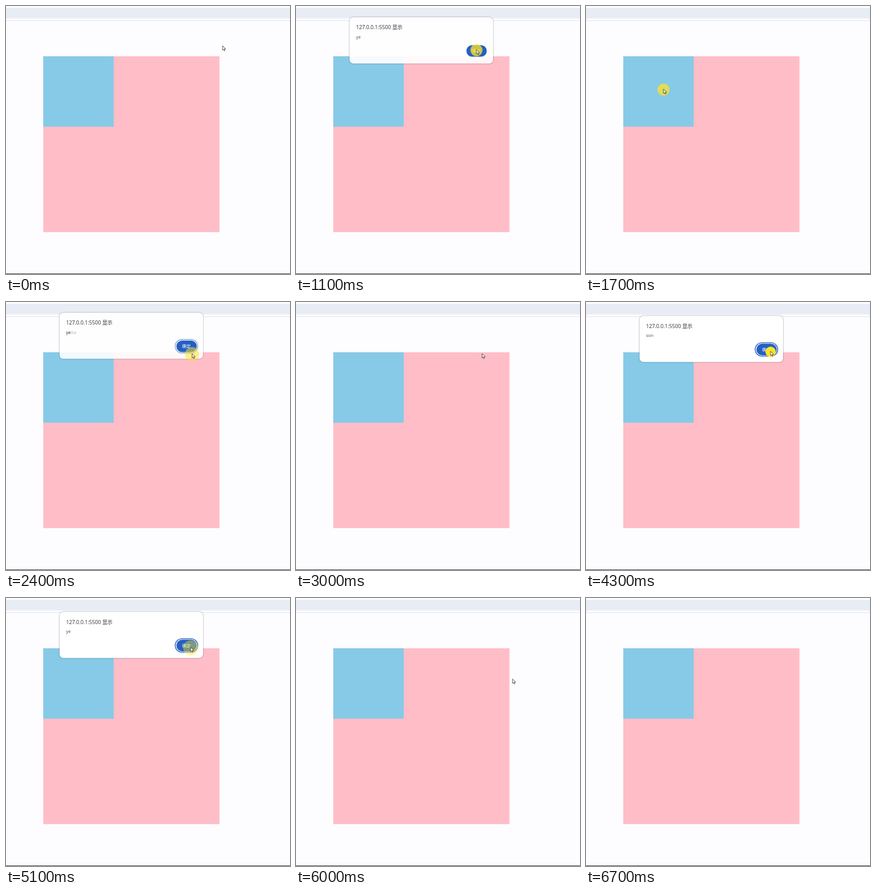
Recreate the animation shown at these times as an HTML page. Size 480 by 452 pixels, loop 7700 ms.

```html
<!DOCTYPE html>
<html lang="zh">
<head>
<meta charset="utf-8">
<title>Event bubbling</title>
<style>
  html, body { margin: 0; width: 100%; height: 100%; overflow: hidden; background: #fdfcff; }
  svg { display: block; width: 100vw; height: 100vh; }
  text { font-family: "Open Sans", "Noto Sans CJK SC", "Noto Sans CJK", sans-serif; }
  #panel { filter: drop-shadow(0 .9px 1px rgba(40, 45, 60, .55)); }
</style>
</head>
<body>
<svg viewBox="0 0 480 452">
  <rect width="480" height="452" fill="#fdfcff"/>
  <rect y="3" width="480" height="18" fill="#e8edf5"/>
  <rect y="24" width="480" height="1" fill="#e4e6eb"/>
  <rect x="63" y="84.8" width="297.8" height="296.5" fill="#ffbdc7"/>
  <rect x="63" y="84.8" width="119" height="118.8" fill="#86cae8"/>
  <rect y="451" width="480" height="1" fill="#555"/>

  <g id="dialog">
    <rect id="panel" x="90.5" y="23.3" width="242.5" height="77.9" rx="6.5" fill="#fff"/>
    <text x="101.5" y="43.8" font-size="8.7" fill="#2b2c30">127.0.0.1:5500 显示</text>
    <text id="ghost" x="101.5" y="59" font-size="7.4" fill="#4a4b50"></text>
    <text id="message" x="101.5" y="59" font-size="7.4" fill="#4a4b50"></text>
    <rect id="ring" x="286" y="68.6" width="38" height="22.8" rx="11.4" fill="none" stroke="#2861c0" stroke-width="1.4"/>
    <rect x="288" y="70.3" width="34.4" height="19.6" rx="9.8" fill="#2460c2"/>
    <text x="305" y="82.7" font-size="7.2" fill="#fff" text-anchor="middle">确定</text>
  </g>

  <circle id="halo" fill="#fde426"/>
  <path id="cursor" d="M0 0V7.4L1.7 5.9L2.9 8.5L4.1 8L3 5.4H5.2Z" fill="#fff" stroke="#333" stroke-width=".8" stroke-linejoin="round"/>
</svg>
<script>
const LOOP = 7700, STEP = 100, OPEN_DELAY = 200, HALO_LIFE = 250, LIFT = 5.4;
const el = id => document.getElementById(id);
const [dialog, panel, ghost, message, ring, halo, cursor] =
  ["dialog", "panel", "ghost", "message", "ring", "halo", "cursor"].map(el);

// A click on a box bubbles up through its ancestors, one alert each.
// hold: how long an alert stays; lag: time from pressing OK to the change
const rounds = [
  { at: 300, spot: [335, 87], ok: [305, 73.5], hold: 310, lag: 120, texts: ["baba", "ye"] },
  { at: 1600, spot: [131, 140], ok: [314.5, 87], hold: 300, lag: 200, texts: ["son", "baba", "ye"] },
  { at: 3600, spot: [131, 137], ok: [312, 83], hold: 560, lag: 60, texts: ["son", "baba", "ye"] }
];

const stops = [{ time: 0, pos: [366, 67] }];
const clicks = [];
const alerts = [];

for (const { at, spot, ok, hold, lag, texts } of rounds) {
  const open = at + OPEN_DELAY, end = open + hold * texts.length;
  const from = stops[stops.length - 1];
  stops.push(
    { time: Math.max(from.time, at - 400), pos: from.pos },
    { time: at, pos: spot }, { time: at + 100, pos: spot },
    { time: at + 300, pos: ok }, { time: end, pos: ok }
  );
  clicks.push(at);
  texts.forEach((text, i) => {
    const start = open + i * hold;
    alerts.push({ text, start, end: start + hold, previous: texts[i - 1], last: i === texts.length - 1 });
    clicks.push(start + hold - lag);
  });
}
stops.push(
  { time: 5600, pos: [343, 113] }, { time: 6400, pos: [389, 160] }, { time: 6700, pos: [478, 249] }
);

function pointerAt(t) {
  const next = stops.findIndex(s => s.time > t);
  if (next < 0) return null;
  const a = stops[next - 1], b = stops[next];
  const k = (t - a.time) / (b.time - a.time);
  return a.pos.map((v, i) => v + (b.pos[i] - v) * k);
}

function set(node, attrs) {
  for (const name in attrs) node.setAttribute(name, attrs[name]);
}

function show(node, on) {
  node.style.display = on ? "" : "none";
}

function drawAlert(t) {
  const alert = alerts.find(a => t >= a.start && t < a.end);
  show(dialog, alert);
  if (!alert) return;
  // One step of fading when an alert replaces another or the last one closes
  const swap = alert.previous ? Math.max(0, 1 - (t - alert.start) / STEP) : 0;
  const close = alert.last ? Math.max(0, 1 - (alert.end - t) / STEP) : 0;
  const fade = Math.max(swap, close);
  set(dialog, { transform: `translate(0 ${-LIFT * fade})` });
  set(panel, { opacity: 1 - .1 * fade });
  set(ring, { opacity: close ? 0 : 1 - .45 * swap });
  set(ghost, { opacity: .4 * swap });
  ghost.textContent = alert.previous || "";
  message.textContent = alert.text;
}

function drawPointer(t) {
  const pos = pointerAt(t);
  const click = clicks.filter(c => c <= t).pop();
  const age = t - click;
  show(cursor, pos);
  show(halo, pos && age < HALO_LIFE);
  if (!pos) return;
  const [x, y] = pos;
  set(cursor, { transform: `translate(${x} ${y})` });
  if (age < HALO_LIFE) {
    set(halo, { cx: x, cy: y + 1, r: 8.7 + .016 * age, opacity: 1 - .0024 * age });
  }
}

const begin = performance.now();
function tick() {
  const elapsed = (performance.now() - begin) % LOOP;
  const t = Math.floor(elapsed / STEP) * STEP;
  drawAlert(t);
  drawPointer(t);
  requestAnimationFrame(tick);
}
tick();
</script>
</body>
</html>
```
